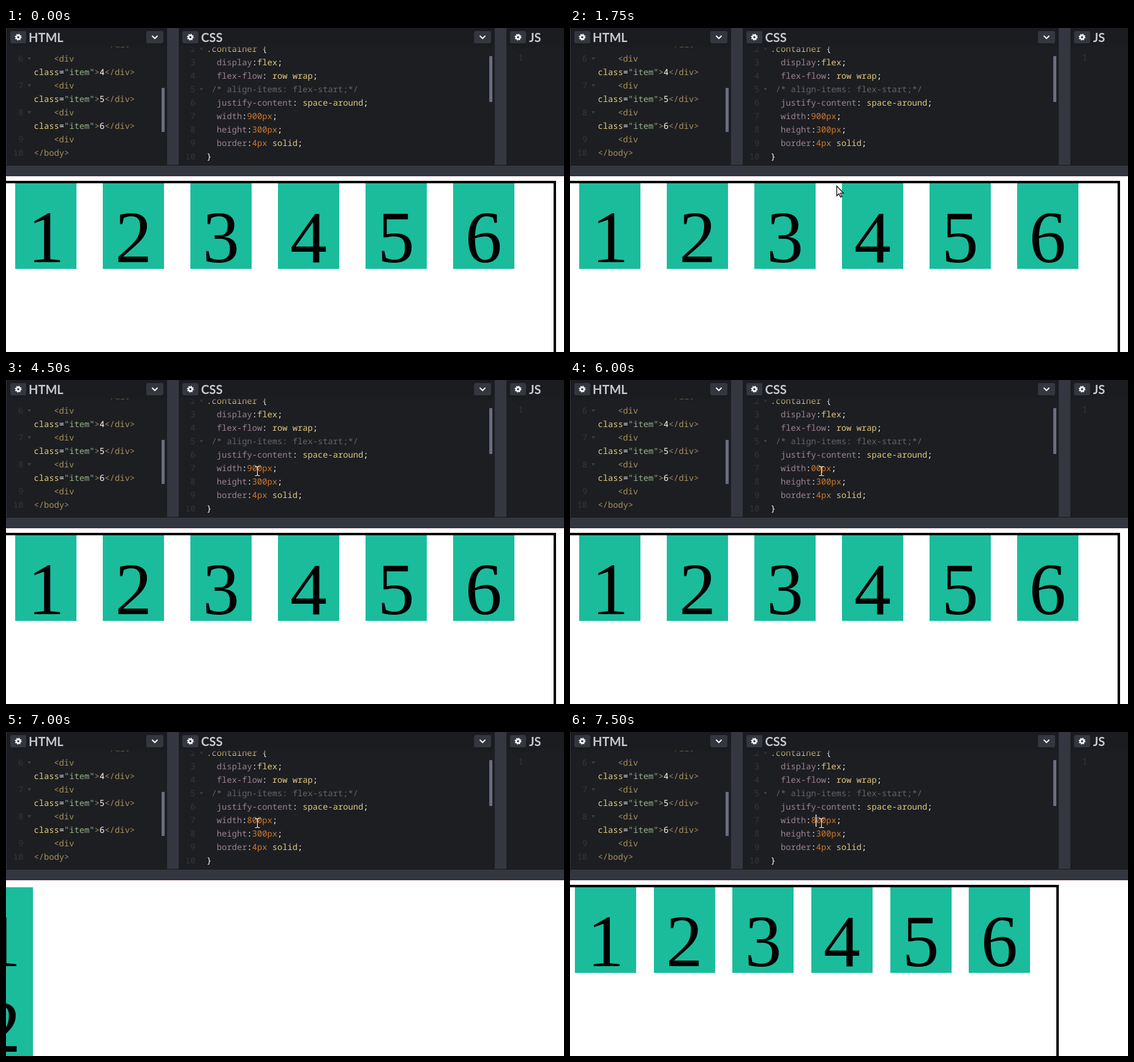
An HTML page that plays this animation: 911 px wide and 530 px high, repeating every 8 s.

```html
<!DOCTYPE html>
<html lang="en">
<head>
<meta charset="utf-8">
<title>Flexbox editor</title>
<style>
html, body { margin: 0; width: 911px; height: 530px; overflow: hidden; background: #fff; }
body { position: relative; }
svg { position: absolute; left: 0; top: 0; }

/* Editor text */
.code { font: 500 13.75px "Noto Sans Mono", monospace; fill: #fff; text-rendering: geometricPrecision; }
.code text { white-space: pre; }
.title { font: 700 20px Lato, sans-serif; fill: #c7c9d3; }
.num { fill: #34363c; text-anchor: end; }
.fold { fill: #3b3e45; }
.t { fill: #a7925a; }
.v { fill: #ddca7e; }
.s { fill: #96b38a; }
.p { fill: #9a8297; }
.n { fill: #d0782a; }
.c { fill: #62646a; }

/* Preview */
.box { position: absolute; left: -10px; top: 250px; width: 900px; height: 300px;
  border: 4px solid #000; display: flex; justify-content: space-around; align-items: flex-start; }
.stack { position: absolute; left: -56px; top: 254px; opacity: 0; }
.item { flex: none; width: 100px; height: 140px; background: #1abc9c; color: #000;
  font: 120px/177px "Liberation Serif", serif; text-align: center; }

/* Timeline */
.box, .stack, .anim { animation: 8s step-end infinite; }
.box { animation-name: box; }
.stack { animation-name: stack; }
.arrow { animation-name: arrow; }
.beam { animation-name: beam; }
.caret { animation-name: caret; }
.w900 { animation-name: w900; }
.w00 { animation-name: w00; }
.w800 { animation-name: w800; }

@keyframes box {
  0% { width: 900px; opacity: 1; }
  78.125% { width: 900px; opacity: 0; }
  90.625%, 100% { width: 800px; opacity: 1; }
}
@keyframes stack {
  0% { opacity: 0; }
  78.125% { opacity: 1; }
  90.625%, 100% { opacity: 0; }
}
@keyframes arrow {
  0% { opacity: 0; transform: translate(435px, 435px); }
  6.25% { opacity: 1; transform: translate(435px, 435px); }
  9.375% { opacity: 1; transform: translate(437px, 311px); }
  21.875% { opacity: 1; transform: translate(435px, 258px); }
  25%, 100% { opacity: 0; transform: translate(435px, 258px); }
}
@keyframes beam {
  0% { opacity: 0; transform: translate(439px, 223px); }
  25% { opacity: 1; transform: translate(439px, 223px); }
  28.125% { opacity: 1; transform: translate(441px, 199px); }
  31.25% { opacity: 1; transform: translate(422px, 152px); }
  34.375% { opacity: 1; transform: translate(423px, 164px); }
  37.5% { opacity: 1; transform: translate(422px, 158px); }
  40.625% { opacity: 1; transform: translate(411px, 150px); }
  43.75%, 100% { opacity: 1; transform: translate(410px, 149px); }
}
@keyframes caret {
  0%, 43.75%, 56.25% { opacity: 0; transform: none; }
  40.625%, 50%, 62.5% { opacity: 1; transform: none; }
  68.75% { opacity: 1; transform: translateX(-8px); }
  75% { opacity: 0; transform: translateX(-8px); }
  81.25% { opacity: 1; transform: none; }
  87.5% { opacity: 0; transform: none; }
  93.75%, 100% { opacity: 1; transform: none; }
}
@keyframes w900 { 0% { opacity: 1; } 68.75%, 100% { opacity: 0; } }
@keyframes w00 { 0% { opacity: 0; } 68.75% { opacity: 1; } 81.25%, 100% { opacity: 0; } }
@keyframes w800 { 0% { opacity: 0; } 81.25%, 100% { opacity: 1; } }
</style>
</head>
<body>
<div class="box">
  <div class="item">1</div>
  <div class="item">2</div>
  <div class="item">3</div>
  <div class="item">4</div>
  <div class="item">5</div>
  <div class="item">6</div>
  <div></div>
</div>
<div class="stack">
  <div class="item">1</div>
  <div class="item">2</div>
</div>

<svg width="911" height="530" viewBox="0 0 911 530">
  <defs>
    <linearGradient id="fade" x2="0" y2="1">
      <stop stop-color="#1b1c20" stop-opacity=".6"/>
      <stop offset="1" stop-color="#1d1e22" stop-opacity="0"/>
    </linearGradient>
    <clipPath id="pane"><path d="M0 30H911V224H0Z"/></clipPath>
    <g id="gear">
      <rect x="-13" y="-10" width="26" height="20" rx="3" fill="#343740"/>
      <g fill="none" stroke="#fff">
        <circle r="3.1" stroke-width="2.6"/>
        <circle r="4.7" stroke-width="1.7" stroke-dasharray="1.846"/>
      </g>
    </g>
    <g id="menu">
      <rect x="-14" y="-10" width="28" height="20" rx="3" fill="#343740"/>
      <path d="M-4.5-2.3L0 2.2 4.5-2.3" fill="none" stroke="#fff" stroke-width="2"/>
    </g>
    <path id="fold" class="fold" d="M-2.7-2H2.7L0 2.5Z"/>
  </defs>

  <!-- Panes and dividers -->
  <path fill="#1d1e22" d="M0 0H911V224H0Z"/>
  <path fill="#343740" d="M263 0H282V225H263ZM798 0H817V225H798ZM0 225H911V241H0ZM0 0H1V224H0Z"/>
  <path fill="#17181b" d="M0 224H911V225H0Z"/>
  <path fill="#1c1419" d="M0 241H911V242H0Z"/>
  <path fill="#b5a5ae" d="M0 242H911V243H0Z"/>

  <g class="code" clip-path="url(#pane)">
    <g class="num">
      <text x="28.3" y="55">6</text>
      <text x="28.3" y="99">7</text>
      <text x="28.3" y="143">8</text>
      <text x="28.3" y="187">9</text>
      <text x="28.3" y="209">10</text>
      <text x="309.3" y="39">2</text>
      <text x="309.3" y="61">3</text>
      <text x="309.3" y="83">4</text>
      <text x="309.3" y="105">5</text>
      <text x="309.3" y="127">6</text>
      <text x="309.3" y="149">7</text>
      <text x="309.3" y="171">8</text>
      <text x="309.3" y="193">9</text>
      <text x="309.3" y="215">10</text>
      <text x="844.5" y="53">1</text>
    </g>
    <use href="#fold" x="38" y="50"/>
    <use href="#fold" x="38" y="94"/>
    <use href="#fold" x="38" y="138"/>
    <use href="#fold" x="319" y="34"/>
    <use href="#fold" x="319" y="100"/>

    <g class="t">
      <text x="161.4" y="31.5">&lt;/div&gt;</text>
      <text x="78.3" y="55">&lt;div</text>
      <text x="78.3" y="99">&lt;div</text>
      <text x="78.3" y="143">&lt;div</text>
      <text x="78.3" y="187">&lt;div</text>
      <text x="45.4" y="209">&lt;/body&gt;</text>
    </g>
    <text x="45.4" y="77"><tspan class="v">class</tspan>=<tspan class="s">"item"</tspan><tspan class="t">&gt;</tspan>4<tspan class="t">&lt;/div&gt;</tspan></text>
    <text x="45.4" y="121"><tspan class="v">class</tspan>=<tspan class="s">"item"</tspan><tspan class="t">&gt;</tspan>5<tspan class="t">&lt;/div&gt;</tspan></text>
    <text x="45.4" y="165"><tspan class="v">class</tspan>=<tspan class="s">"item"</tspan><tspan class="t">&gt;</tspan>6<tspan class="t">&lt;/div&gt;</tspan></text>

    <g transform="translate(.7)">
      <text x="326.8" y="39"><tspan class="v">.container</tspan> {</text>
      <text x="343.3" y="61"><tspan class="p">display</tspan>:<tspan class="v">flex</tspan>;</text>
      <text x="343.3" y="83"><tspan class="p">flex-flow</tspan>: <tspan class="v">row wrap</tspan>;</text>
      <text x="335.1" y="105" class="c">/* align-items: flex-start;*/</text>
      <text x="343.3" y="127"><tspan class="p">justify-content</tspan>: <tspan class="v">space-around</tspan>;</text>
      <text x="343.3" y="149"><tspan class="p">width</tspan>:</text>
      <text x="392.8" y="149" class="anim w900"><tspan class="n">900px</tspan>;</text>
      <text x="392.8" y="149" class="anim w00" opacity="0"><tspan class="n">00px</tspan>;</text>
      <text x="392.8" y="149" class="anim w800" opacity="0"><tspan class="n">800px</tspan>;</text>
      <text x="343.3" y="171"><tspan class="p">height</tspan>:<tspan class="n">300px</tspan>;</text>
      <text x="343.3" y="193"><tspan class="p">border</tspan>:<tspan class="n">4px</tspan> <tspan class="v">solid</tspan>;</text>
      <text x="326.8" y="215">}</text>
    </g>
  </g>

  <!-- Headers -->
  <path fill="#1b1c20" d="M1 0H263V30H1ZM282 0H798V30H282ZM817 0H911V30H817Z"/>
  <path fill="url(#fade)" d="M1 30H263V39H1ZM282 30H798V39H282ZM817 30H911V39H817Z"/>
  <g class="title">
    <text x="37" y="22.5">HTML</text>
    <text x="318.5" y="22.5">CSS</text>
    <text x="854" y="22.5">JS</text>
  </g>
  <use href="#gear" x="20" y="15"/>
  <use href="#gear" x="301" y="15"/>
  <use href="#gear" x="836" y="15"/>
  <use href="#menu" x="243" y="15"/>
  <use href="#menu" x="778" y="15"/>
  <path fill="#6a6e80" d="M254 98H259V170H254ZM789 46H794V121H789Z"/>

  <!-- Caret and pointers -->
  <rect class="anim caret" x="401" y="135" width="1.3" height="20" fill="#fff"/>
  <path class="anim beam" d="M-3.5-7.5H-1L.5-6.5 2-7.5H4.5M.5-6.5V6.5M-3.5 7.5H-1L.5 6.5 2 7.5H4.5" fill="none" stroke="#f4f4f4" stroke-width="1.1"/>
  <path class="anim arrow" d="M.5.5V16.5L4.2 13 6.7 18.6 9 17.6 6.6 12.2H11.6Z" fill="#fff" stroke="#000" stroke-width="1.2"/>
</svg>
</body>
</html>
```
